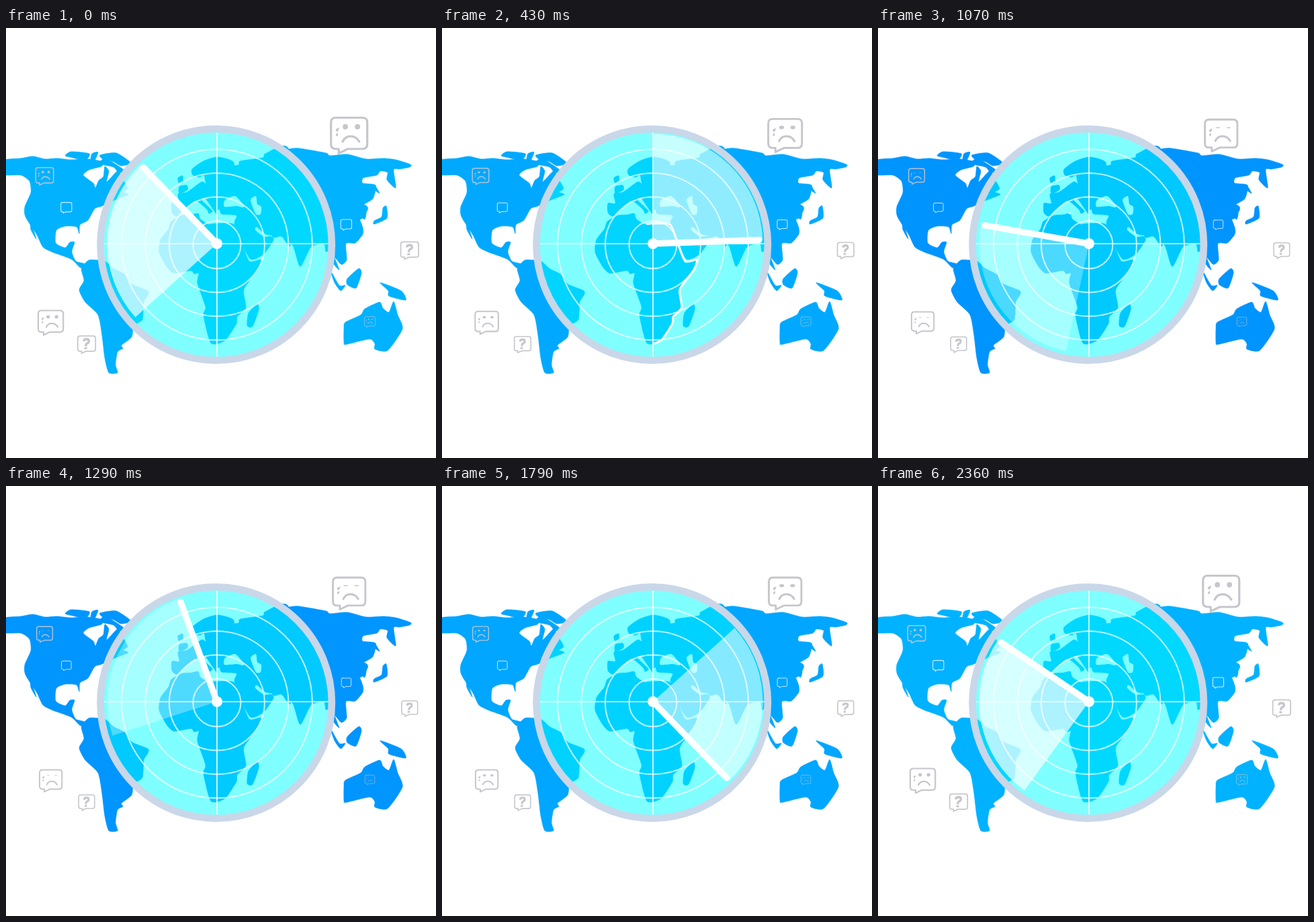
An HTML page for the animation above (2.43 s loop, 640 by 640 pixels).

```html
<!DOCTYPE html>
<html lang="en">
<head>
<meta charset="utf-8">
<title>Radar over a world map</title>
<style>
  html, body { margin: 0; width: 100%; height: 100%; overflow: hidden; background: #fff; }
  svg { display: block; width: 100vw; height: 100vh; }
  .line { fill: none; stroke: #c6c7cd; stroke-linecap: round; stroke-linejoin: round; }
  .solid { fill: #c6c7cd; }
</style>
</head>
<body>
<svg id="stage" viewBox="0 0 640 640" xmlns="http://www.w3.org/2000/svg">
  <g id="land" stroke-width=".6" stroke-linejoin="round"></g>
  <g id="sea" fill="#fff"></g>
  <circle cx="312.7" cy="322.5" r="169" fill="#0ff" fill-opacity=".5"/>
  <path id="sector" fill="#fff"/>
  <g id="grid" fill="none" stroke="#fff" stroke-opacity=".75" stroke-width="2"></g>
  <path id="trace" fill="none" stroke="#fff" stroke-width="3.2" stroke-linecap="round" stroke-linejoin="round" pathLength="1"/>
  <circle cx="312.7" cy="322.5" r="172.2" fill="none" stroke="#c9d7e8" stroke-width="10.6"/>
  <path id="ray" d="M314 321V163" stroke="#fff" stroke-width="9.4" stroke-linecap="round"/>
  <circle cx="314" cy="321" r="8" fill="#fff"/>
  <g id="bubbles"></g>
</svg>
<script>
const LOOP = 2430, FPS = 14, HUB = [314, 321];
const $ = id => document.getElementById(id);

function add(parent, tag, attrs) {
  const el = document.createElementNS('http://www.w3.org/2000/svg', tag);
  for (const key in attrs) el.setAttribute(key, attrs[key]);
  return parent.appendChild(el);
}

// Closed, lightly rounded curve through a few points
function outline(text) {
  const p = text.trim().split(/\s+/).map(s => s.split(',').map(Number));
  const n = p.length, at = i => p[(i + n) % n];
  let d = 'M' + p[0];
  for (let i = 0; i < n; i++) {
    const [a, b, c, e] = [at(i - 1), at(i), at(i + 1), at(i + 2)];
    const c1 = b.map((v, j) => v + (c[j] - a[j]) / 9);
    const c2 = c.map((v, j) => v - (e[j] - b[j]) / 9);
    d += `C${c1} ${c2} ${c}`;
  }
  return d + 'Z';
}

const shape = (layer, text) => add($(layer), 'path', { d: outline(text) });

const northAmerica = shape('land', `-4,197 22,194 40,191 58,195 76,194 96,196 122,195 144,199
  142,206 124,211 115,219 130,231 133,238 138,227 145,221 147,206 153,213 150,229 166,213
  173,224 181,239 174,244 182,248 162,256 143,265 132,269 122,286 110,293 109,306 105,296
  88,295 75,301 74,320 88,327 95,319 102,319 98,333 104,347 117,351 111,357 97,344 70,334
  55,326 46,308 29,281 28,266 37,245 35,228 22,219 -4,218`);

const baja = shape('land', '37,290 45,314 37,300');
const victoria = shape('land', '88,190 97,184 124,187 118,197 99,193');
const ellesmere = shape('land', '128,187 137,185 131,199 126,197');
const baffin = shape('land', '140,189 164,186 186,201 171,205 160,199 144,195');
const foxe = shape('land', '139,202 148,194 175,211 168,216 160,207');

const southAmerica = shape('land', `117,351 125,345 147,347 160,358 177,367 187,381 211,391
  211,398 205,408 203,434 190,443 187,460 172,472 174,477 166,482 163,501 166,513 153,513
  147,491 143,458 137,427 118,408 109,390 116,376 112,359`);

const africa = shape('land', `286,276 289,284 301,292 311,291 339,292 349,315 362,347 379,345
  375,360 354,389 357,416 344,430 343,440 326,465 305,469 294,428 297,415 285,380 287,365
  280,366 275,361 250,365 239,355 228,334 230,315 242,299 246,288 262,279 275,278`);

const madagascar = shape('land', '374,411 376,420 367,444 359,443 361,424');

const europe = shape('land', `247,261 258,261 256,247 270,244 291,229 300,232 328,224 330,207
  346,204 349,198 382,193 386,187 421,181 424,320 410,310 387,307 373,296 371,301 384,311
  394,310 398,316 383,337 364,344 347,313 340,290 343,279 321,277 318,270 313,272 314,278
  297,254 291,256 307,272 302,276 299,270 283,257 271,265 255,280 247,275`);

const scandinavia = shape('land', '278,219 277,210 294,198 315,192 339,200 332,228 300,234 295,219 288,222');
const ireland = shape('land', '256,223 263,220 263,230 257,230');
const britain = shape('land', '258,236 269,234 270,241 258,246');

const siberia = shape('land', `408,184 422,180 436,179 476,186 482,190 508,188 536,195 562,194
  580,196 602,203 601,207 586,210 577,211 580,238 567,226 568,215 557,213 552,219 532,223
  531,231 550,234 546,254 530,265 526,285 400,285 400,186`);

const southAsia = shape('land', `400,245 530,262 536,276 533,285 523,270 515,272 524,280
  531,297 531,307 520,320 506,321 507,345 499,352 489,341 496,360 487,350 482,332 476,333
  473,321 454,326 438,355 427,324 410,310 396,309`);

const sakhalin = shape('land', '549,234 556,246 549,241');
const japan = shape('land', '561,268 566,265 567,283 548,292 548,287 559,281');
const sumatra = shape('land', '483,361 496,383 505,383 498,391 489,379');
const borneo = shape('land', '508,373 525,358 529,365 521,387 508,382');
const newGuinea = shape('land', '557,379 588,391 595,405 570,399 569,391');

const australia = shape('land', `505,438 528,427 534,418 556,408 561,417 570,423 577,407
  583,427 590,448 568,480 549,478 549,470 541,463 506,471 503,468 503,447`);

const blackSea = shape('sea', '325,266 326,256 341,250 354,264 353,267 343,265');
const caspian = shape('sea', '364,256 372,250 374,262 380,266 379,277 372,277');

$('trace').setAttribute('d', africa.getAttribute('d'));
for (let i = 1; i < 5; i++) add($('grid'), 'circle', { cx: 313.9, cy: 322.6, r: 35.5 * i });
add($('grid'), 'path', { d: 'M314 156V489M146 321H480' });

const eyes = [], bubbles = [];

function bubble(kind, x, y, size, opacity = 1) {
  const el = add($('bubbles'), 'g', { opacity });
  const body = add(el, 'path', {
    class: 'line', 'stroke-width': kind === 'sad' ? 3.2 : 3.6,
    d: 'M-20 -26.5H20Q27 -26.5 27 -19.5V13Q27 20 20 20H-2L-15.5 26.5V20H-20Q-27 20 -27 13V-19.5Q-27 -26.5 -20 -26.5Z'
  });
  if (kind === 'empty') body.style.stroke = '#fff';
  if (kind === 'ask') {
    add(el, 'path', { class: 'line', 'stroke-width': 7, style: 'stroke-linecap:butt',
      d: 'M-8.5 -10Q-8 -17 0 -17Q7 -17 7 -11Q7 -6 1.5 -4Q-2.5 -2 -2.5 5' });
    add(el, 'rect', { class: 'solid', x: -7, y: 8, width: 8, height: 6 });
  }
  if (kind === 'sad') {
    for (const ex of [-5.6, 12.4]) {
      const spot = add(el, 'g', { transform: `translate(${ex} -13)` });
      eyes.push(add(spot, 'circle', { class: 'solid', r: 3.9 }));
    }
    add(el, 'path', { class: 'line', 'stroke-width': 3.4, d: 'M-9.5 9C-5 -1.5 9 -1.5 15 9' });
    add(el, 'path', { class: 'solid',
      d: 'M-14.5 -11.5Q-20 -11 -20 -7.5Q-19 -5 -16.5 -6.5ZM-16.5 -4Q-20 -3 -20 0Q-18 2 -16.5 -.5Z' });
  }
  bubbles.push({ el, x, y, size });
}

bubble('sad', 510.7, 160, 1);
bubble('sad', 66.6, 438.8, .69);
bubble('sad', 57.5, 220.8, .49, .9);
bubble('sad', 541.5, 437.5, .3, .65);
bubble('ask', 120, 471.3, .49);
bubble('ask', 600.8, 331.3, .49);
bubble('empty', 89.8, 267.6, .3, .8);
bubble('empty', 506.4, 293, .3, .8);

const clamp = v => Math.min(1, Math.max(0, v));
const ease = (t, from, to) => { const u = clamp((t - from) / (to - from)); return u * u * (3 - 2 * u); };

function polar(deg, r) {
  const a = deg * Math.PI / 180;
  return `${HUB[0] + r * Math.sin(a)} ${HUB[1] - r * Math.cos(a)}`;
}

function draw(time) {
  const frame = Math.min(33, Math.floor((time + 5) * FPS / 1000));
  const t = frame * 1000 / FPS;

  // One turn is thirty steps of 12 degrees spread over 17 ticks
  const angle = 316 + 12 * Math.ceil(frame * 30 / 17);
  const glow = (1 + Math.cos(2 * Math.PI * Math.min(1, t / 2290))) / 2;

  const color = `rgb(0,${Math.round(148 + 30 * glow)},255)`;
  $('land').setAttribute('fill', color);
  $('land').setAttribute('stroke', color);

  $('ray').setAttribute('transform', `rotate(${angle} ${HUB})`);
  $('sector').setAttribute('d', `M${HUB}L${polar(angle - 88, 163.5)}A163.5 163.5 0 0 1 ${polar(angle, 163.5)}Z`);
  $('sector').setAttribute('fill-opacity', .29 + .39 * glow);

  const head = ease(t, 0, 860), tail = ease(t, 350, 945);
  const trace = $('trace').style;
  trace.display = frame > 0 && frame < 16 ? '' : 'none';
  trace.strokeDasharray = `${Math.max(.0005, head - tail)} 2`;
  trace.strokeDashoffset = -Math.min(tail, .9985);

  const zoom = 1 - .105 * (ease(t, 0, 690) - ease(t, 1740, 2300));
  for (const b of bubbles) b.el.setAttribute('transform', `translate(${b.x} ${b.y}) scale(${b.size * zoom})`);
  for (const eye of eyes) eye.setAttribute('transform', `scale(1 ${.22 + .78 * glow})`);
}

const begin = performance.now();
function tick() {
  draw((performance.now() - begin) % LOOP);
  requestAnimationFrame(tick);
}
tick();
</script>
</body>
</html>
```
